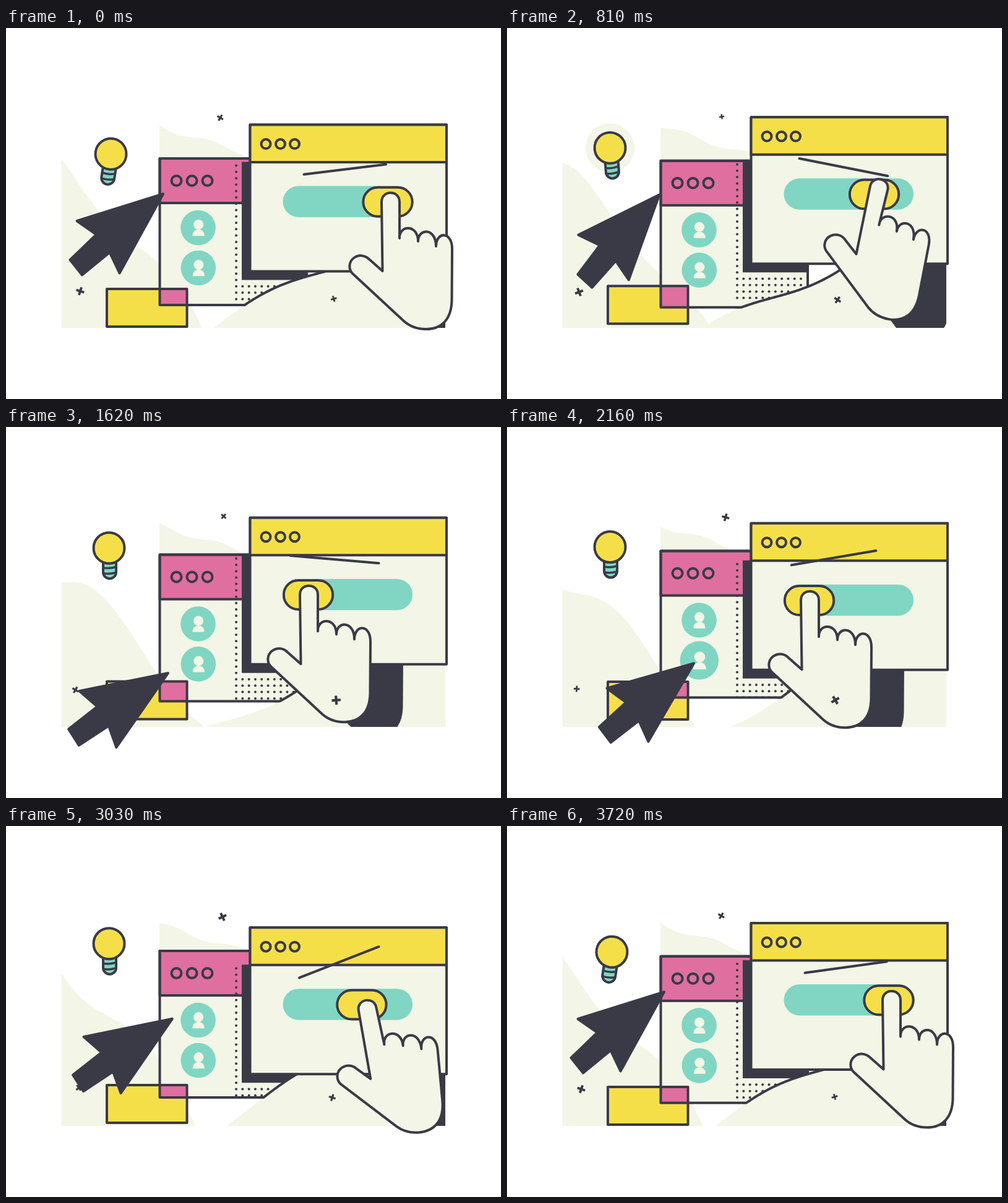
Recreate the animation shown at these times as an HTML page with a canvas. Size 800 by 600 pixels, loop 3750 ms.

```html
<!DOCTYPE html>
<html lang="en">
<head>
<meta charset="utf-8">
<title>Drag the switch</title>
<style>
  html, body { margin: 0; width: 100%; height: 100%; overflow: hidden; background: #fff; }
  canvas { display: block; }
</style>
</head>
<body>
<canvas id="stage" width="800" height="600"></canvas>
<script>
const LOOP = 3750;
const CREAM = '#f3f5e6', YELLOW = '#f5df49', PINK = '#df6f9f', TEAL = '#80d6c3', DARK = '#3a3a47';
const ctx = document.getElementById('stage').getContext('2d');
let now = 0;

// --- motion -------------------------------------------------------------

const progress = (from, to) => Math.min(1, Math.max(0, (now - from) / (to - from)));

// Eased step from 0 to 1.
function ramp(from, to) {
  const u = progress(from, to);
  return u * u * (3 - 2 * u);
}

// Soft rise from 0 to 1 and back.
const bump = (from, to) => Math.sin(Math.PI * progress(from, to)) ** 2;

const wave = (mid, amp, peak, cycles = 1) =>
  mid + amp * Math.cos(2 * Math.PI * cycles * (now - peak) / LOOP);

// --- drawing helpers ----------------------------------------------------

function paint(path, fill, width = 4) {
  if (fill) { ctx.fillStyle = fill; ctx.fill(path); }
  if (width) { ctx.lineWidth = width; ctx.strokeStyle = DARK; ctx.stroke(path); }
}

function shape(build) {
  const p = new Path2D();
  build(p);
  return p;
}

const rect = (x, y, w, h) => shape(p => p.rect(x, y, w, h));
const pill = (x, y, w, h) => shape(p => p.roundRect(x, y, w, h, h / 2));
const disc = (x, y, r) => shape(p => p.arc(x, y, r, 0, 7));
const poly = (...pts) => shape(p => pts.forEach(q => p.lineTo(...q)));

function scoped(draw) {
  ctx.save();
  draw();
  ctx.restore();
}

function posed(x, y, deg, scale, draw) {
  scoped(() => {
    ctx.translate(x, y);
    ctx.rotate(deg * Math.PI / 180);
    ctx.scale(scale, scale);
    draw();
  });
}

function clipped(path, draw) {
  scoped(() => {
    ctx.clip(path);
    draw();
  });
}

// Hill line over x0..x1; height(d) takes the distance from x0.
function ridge(x0, x1, height) {
  return shape(p => {
    for (let x = x0; x <= x1; x += 2) p.lineTo(x, height(x - x0));
  });
}

function fillBelow(edge, x0, x1, y) {
  const p = new Path2D(edge);
  p.lineTo(x1, y);
  p.lineTo(x0, y);
  paint(p, CREAM, 0);
}

// --- parts --------------------------------------------------------------

const GROUND = rect(89.5, 0, 620.5, 485);

// Segments relative to the root of the index finger.
const FINGER = [[-1.5, -112], [-1.5, -131.3, 27.5, -131.3, 27.5, -112]];
const PALM = [
  [27.5, -53],
  [26.5, -75, 57.5, -76, 57.5, -48], [57.5, -70, 86.5, -70, 86.5, -40], [86.5, -64, 112.5, -65, 112.5, -36],
  [112, 47], [111.5, 79, 94.5, 94, 70.5, 94], [55.5, 94, 43.5, 89, 34.5, 81],
  [-48.5, 4], [-55.5, -3, -54.5, -15, -46.5, -21], [-38.5, -27, -28.5, -26, -21.5, -19]
];

function handPath(bend) {
  return shape(p => {
    const add = (segs, deg) => {
      const c = Math.cos(deg * Math.PI / 180), s = Math.sin(deg * Math.PI / 180);
      for (const seg of segs) {
        const q = seg.map((v, i) => i % 2 ? seg[i - 1] * s + v * c : v * c - seg[i + 1] * s);
        q.length > 2 ? p.bezierCurveTo(...q) : p.lineTo(...q);
      }
    };
    p.moveTo(0, 0);
    add(FINGER, bend);
    add(PALM, 0);
    p.closePath();
  });
}

// The hill edges are travelling waves.
function backHills() {
  const left = ridge(89, 345, d =>
    wave(235 + .7 * d + .0018 * d * d, 13 + ((d - 126) / 34) ** 2, 2150 + 19 * d));
  clipped(GROUND, () => fillBelow(left, 89, 345, 600));
  const top = ridge(248, 394, d => wave(159 + .32 * d, 4, 560 - 18 * d, 2));
  fillBelow(top, 248, 394, 300);
}

function frontHill(bottom) {
  const edge = ridge(300, 710, d => wave(505 - .53 * d, 14, 3180 - 11 * d));
  clipped(GROUND, () => fillBelow(edge, 300, 710, 600));
  clipped(rect(300, 0, 500, bottom + 2), () => paint(edge));
}

function user(x, y, scale) {
  posed(x, y, 0, scale, () => {
    paint(disc(0, 0, 28.3), TEAL, 0);
    paint(disc(.5, -5, 8), CREAM, 0);
    paint(new Path2D('M-9 13.2V11.5A9.5 9 0 0 1 10 11.5V13.2Z'), CREAM, 0);
  });
}

function panel(y, winY) {
  const frame = rect(248.5, y, 237.5, 237);
  paint(frame, CREAM, 0);
  paint(rect(248.5, y, 237.5, 72), PINK);
  clipped(frame, () => {
    for (let row = 0; row < 23; row++) {
      const cols = row < 19 ? 1 : 11;
      for (let col = 0; col < cols; col++) {
        paint(disc(372 + col * 10.3, winY + 66 + row * 10.28, 2), DARK, 0);
      }
    }
    paint(rect(381, winY + 60, 200, 191), DARK, 0);
  });
  paint(frame);
  for (const x of [275.5, 300.5, 325.5]) paint(disc(x, y + 36, 8));
  user(310.5, y + 112, 1);
  user(310.8, y + 177, 1 + .1 * (ramp(1620, 2140) - ramp(2500, 2900)));
}

function card(bottom) {
  const y = wave(416.6, 5.4, 3700);
  const frame = rect(163, y, 129.5, 61);
  paint(frame, YELLOW, 0);
  paint(rect(248.5, y, 44, bottom - y), PINK, 0);
  paint(frame);
  paint(poly([248.5, y], [248.5, bottom], [292.5, bottom]));
}

function browser(y) {
  paint(rect(394.5, y, 317.5, 237), CREAM);
  paint(rect(394.5, y, 317.5, 60.5), YELLOW);
  for (const x of [420, 443.5, 466.5]) paint(disc(x, y + 31, 7.5));
  paint(poly(
    [wave(470, 11.5, 0), wave(225.4, 20.5, 3160)],
    [wave(606.5, 10.5, 450), wave(215.3, 24, 810)]
  ));
  paint(pill(447.5, y + 99, 209.5, 50.5), TEAL, 0);
  const knob = 617 - 128.5 * (ramp(620, 1320) - ramp(2630, 3280));
  paint(pill(knob - 39.7, y + 101.3, 79.4, 47), YELLOW);
}

function bulb() {
  const squat = 1 - ramp(100, 400) + ramp(3330, 3700);
  const hop = bump(100, 600);
  const x = 166.5 + 3 * squat;
  const y = wave(192.7, 3, 1500) + 13.5 * squat - 22 * hop;
  paint(disc(x, y, 52 * (ramp(100, 350) - ramp(700, 1050))), CREAM, 0);
  posed(x, y, 8.5 * squat - 5 * bump(150, 1200), 1, () => {
    paint(new Path2D('M-9.5 18V39A10.5 10.5 0 0 0 11.5 39V18Z'), TEAL);
    paint(new Path2D('M-9.5 32Q2 34 11.5 30.5M-9.5 41Q2 43 11.5 39.5'), null, 3.5);
    paint(disc(0, 0, 25), YELLOW);
  });
}

function cursor() {
  const windUp = bump(500, 1250), drop = ramp(790, 1200), lift = ramp(1250, 1620);
  const slide = ramp(1640, 2140), pull = bump(2500, 3280), back = ramp(2690, 3280);
  const x = 256 - 8.6 * windUp + 8 * drop + 40 * slide - 5 * pull - 48 * back;
  const y = 267 + 130 * drop - 16 * slide - 114 * back;
  const tilt = -9.7 * windUp + 6 * lift - 4.6 * slide + 7.5 * pull - 1.4 * back;
  posed(x, y, tilt, 1, () => {
    const p = poly([-2, 1.2], [-141.5, 45], [-110, 67], [-152.5, 108], [-133, 132.5], [-88.5, 96], [-72.5, 129.5]);
    p.closePath();
    paint(p, DARK);
  });
}

function spark(x, y, size, angle) {
  posed(x, y, angle - 180 * now / LOOP, size, () => paint(new Path2D('M-1 0H1M0 -1V1'), null, .58));
}

function sparks() {
  ctx.lineCap = 'butt';
  spark(wave(349.5, 3.7, 2160), wave(145.2, 1.9, 2800), wave(5.5, 1.4, 2800), 30);
  spark(wave(116, 4, 3700), wave(425, 2, 750), wave(5.9, 1.1, 500), 18);
  spark(wave(531, 3.8, 1150), wave(440, 2, 1850), wave(6.1, 1.2, 1800), -17);
  ctx.lineCap = 'round';
}

// --- scene --------------------------------------------------------------

function draw() {
  ctx.clearRect(0, 0, 800, 600);
  ctx.lineCap = ctx.lineJoin = 'round';
  const winY = wave(153.6, 10.6, 2980);
  const panelY = wave(207.1, 7.9, 630);

  // The palm leads each drag while the fingertip trails.
  const pullLeft = bump(540, 1240), pullRight = bump(2530, 3190);
  const lean = pullLeft - pullRight;
  const handX = 608.5 - 132 * (ramp(540, 1240) - ramp(2530, 3190));
  const hand = handPath(2 * pullLeft - 7.5 * pullRight);
  const atHand = fn => posed(handX, winY + 236.5 - 17.3 * lean, 12 * lean, 1, fn);

  backHills();
  panel(panelY, winY);
  frontHill(panelY + 237);
  card(panelY + 237);
  clipped(GROUND, () => atHand(() => {
    ctx.translate(51, 22);
    paint(hand, DARK);
  }));
  browser(winY);
  atHand(() => paint(hand, CREAM));
  bulb();
  sparks();
  cursor();
}

const start = performance.now();
function tick() {
  now = (performance.now() - start) % LOOP;
  draw();
  requestAnimationFrame(tick);
}
tick();
</script>
</body>
</html>
```
